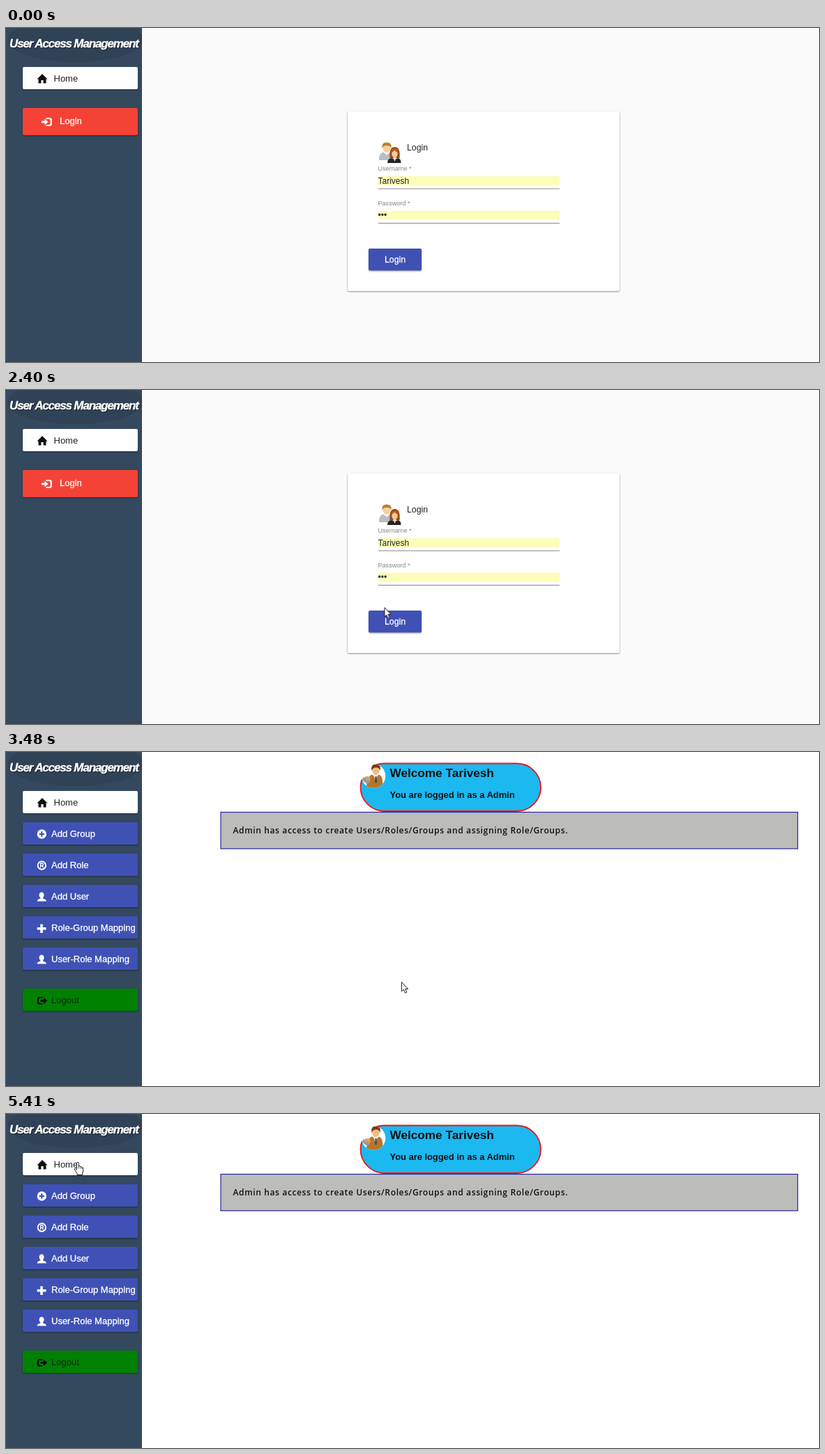
An HTML page for the animation above (8000 ms loop, 1166 by 480 pixels).

```html
<!DOCTYPE html>
<html lang="en">
<head>
<meta charset="utf-8">
<title>User Access Management</title>
<style>
  html, body { margin: 0; width: 100%; height: 100%; overflow: hidden; background: #fff; }
  svg { display: block; width: 100%; height: 100%; }
  text { font: 13px "Liberation Sans", Arial, sans-serif; fill: #222; }

  .title { font-size: 17px; font-weight: bold; font-style: italic; letter-spacing: -1.15px;
    fill: #fff; stroke: #fff; stroke-width: .4; filter: drop-shadow(1px 1px 0 #141d26); }
  .light text { fill: #fff; stroke: #fff; stroke-width: .3; }
  .label { font-size: 9.1px; fill: #858585; }
  .field { font-size: 12px; }
  .small { font-size: 12.3px; }
  .welcome { font-size: 17.2px; font-weight: bold; fill: #111; }
  .status { font-size: 12.9px; font-weight: bold; fill: #111; }
  .note { font: 600 12px "Open Sans", "Noto Sans", sans-serif; letter-spacing: .63px; fill: #111; }
  .raised { filter: drop-shadow(0 1.5px 1.2px rgba(0, 0, 0, .4)); }
  .card { filter: drop-shadow(0 1px 1.3px rgba(0, 0, 0, .45)); }
  .pressed { filter: drop-shadow(0 3px 3px rgba(0, 0, 0, .5)); }

  /* 1% of the loop is 80 ms */
  .before, .after, .pressed, .ripple, .arrow, .hand { animation: 8s step-end infinite; }
  .before { animation-name: before; }
  .after { animation-name: after; }
  .pressed { animation-name: press; }
  .ripple { animation-name: ripple; }
  .arrow { animation-name: arrow; }
  .hand { animation-name: hand; }
  .cursor { animation: move 8s linear infinite; }

  @keyframes before { 0% { opacity: 1 } 43.45%, 100% { opacity: 0 } }
  @keyframes after { 0% { opacity: 0 } 43.45%, 100% { opacity: 1 } }
  @keyframes press { 0% { opacity: 0 } 41.6%, 100% { opacity: 1 } }
  @keyframes ripple {
    0% { transform: translate(567px, 333px) scale(0) }
    41.6% { transform: translate(567px, 333px) scale(.35) }
    42.6%, 100% { transform: translate(567px, 333px) scale(1) }
  }
  @keyframes hand {
    0% { opacity: 0 } 11.625% { opacity: 1 } 15.225% { opacity: 0 }
    35.7% { opacity: 1 } 42.6% { opacity: 0 }
    63.775% { opacity: 1 } 64.7% { opacity: 0 } 65.6%, 100% { opacity: 1 }
  }
  @keyframes arrow {
    0% { opacity: 0 } 2% { opacity: 1 } 11.625% { opacity: 0 } 15.225% { opacity: 1 }
    35.7% { opacity: 0 } 42.6% { opacity: 1 }
    63.775% { opacity: 0 } 64.7% { opacity: 1 } 65.6%, 100% { opacity: 0 }
  }
  @keyframes move {
    0% { transform: translate(938px, 410px) }
    2% { transform: translate(938px, 410px); animation-timing-function: steps(10, end) }
    11.625% { transform: translate(565px, 332px) }
    12.375% { transform: translate(565px, 332px); animation-timing-function: steps(7, start) }
    19.025% { transform: translate(475px, 321px) }
    30% { transform: translate(475px, 321px); animation-timing-function: steps(2, start) }
    32% { transform: translate(610px, 303px) }
    33.7% { transform: translate(610px, 303px); animation-timing-function: steps(3, start) }
    36.7% { transform: translate(591px, 328px); animation-timing-function: steps(4, start) }
    40.4% { transform: translate(567px, 330px) }
    46.375% { transform: translate(567px, 330px); animation-timing-function: steps(5, start) }
    51.06% { transform: translate(422px, 307px) }
    56.1% { transform: translate(422px, 307px); animation-timing-function: steps(5, start) }
    60.8% { transform: translate(278px, 180px) }
    61% { transform: translate(278px, 180px); animation-timing-function: steps(6, start) }
    66.55% { transform: translate(117px, 78px) }
    66.75% { transform: translate(117px, 78px); animation-timing-function: steps(2, start) }
    68.4%, 100% { transform: translate(103px, 69px) }
  }
</style>
</head>
<body>
<svg viewBox="0 0 1166 480">
  <defs>
    <rect id="item" x="24" width="165" height="32" rx="2"/>
    <path id="person" d="M51 0C53.300 0 54.700 1.800 54.500 4.200C54.400 6 53.700 7 53 7.800V9C55.500 10 57.500 10.300 58 13H44.500C45 10.300 47 10 49.300 9V7.800C48.300 7 47.700 6 47.600 4.200C47.500 1.800 48.900 0 51 0Z"/>
    <clipPath id="sideClip"><rect width="195" height="480"/></clipPath>
    <clipPath id="buttonClip"><rect x="520" y="317" width="76" height="31.500" rx="2"/></clipPath>
    <clipPath id="avatarClip"><circle cx="527" cy="34.500" r="17.300"/></clipPath>
  </defs>

  <rect width="1166" height="480" fill="#fff"/>

  <g clip-path="url(#sideClip)">
    <rect width="195" height="480" fill="#34495e"/>
    <ellipse cx="100" cy="17" rx="97" ry="32" fill="#2f4256"/>
  </g>
  <text class="title" x="5" y="28">User Access Management</text>
  <use href="#item" y="56" fill="#fff" class="raised"/>
  <path d="M52 66L59.500 73.500H57.500V79.500H53.600V75H50.400V79.500H46.500V73.500H44.500Z" fill="#111"/>
  <text x="68.500" y="76.500">Home</text>

  <g class="before">
    <rect x="195" width="971" height="480" fill="#fafafa"/>
    <rect class="raised" x="24" y="115" width="165" height="39" rx="2" fill="#f44336"/>
    <g class="light">
      <path d="M51 133.500H55.500V130.500L60.500 135L55.500 139.500V136.500H51Z" fill="#fff"/>
      <path d="M57.500 130H62.500Q64.700 130 64.700 132.200V137.800Q64.700 140 62.500 140H57.500" fill="none" stroke="#fff" stroke-width="2.200"/>
      <text x="77" y="138">Login</text>
    </g>

    <rect class="card" x="490" y="120" width="390" height="258" rx="2" fill="#fff"/>
    <g>
      <path d="M535 190Q534.500 180 541 178.500L546 182L551 178.500Q555 180 556 190Z" fill="#b9bdc6"/>
      <path d="M543 178L546 183L549 178Z" fill="#fff"/>
      <ellipse cx="546" cy="172.500" rx="5.500" ry="6.500" fill="#f5cf9e"/>
      <path d="M539.500 173Q538 164.500 546 164.500Q554 164.500 552.500 173Q551 168.500 546 169Q541 168.500 539.500 173Z" fill="#b98228"/>
      <path d="M550.500 187Q549 171 557.500 171Q566 171 564.500 187Z" fill="#9b4a17"/>
      <path d="M547 194Q547 187.500 553 187L557.500 189L562 187Q566.500 187.500 566.500 194Z" fill="#242424"/>
      <path d="M555 186H560L557.500 192Z" fill="#f5d5ae"/>
      <ellipse cx="557.500" cy="180.500" rx="4.200" ry="5.700" fill="#f6c999"/>
      <path d="M552.500 179Q553 173 558 173Q562.500 173 562.500 179Q559 178 557 175.500Q555.500 178 552.500 179Z" fill="#b65b1d"/>
    </g>
    <text class="small" x="575" y="176">Login</text>
    <text class="label" x="533.500" y="205">Username *</text>
    <rect x="534" y="213" width="260" height="13" fill="#fbfdb9"/>
    <text class="field" x="533.500" y="223.500">Tarivesh</text>
    <rect x="534" y="230.500" width="260" height="1" fill="#858585"/>
    <text class="label" x="533.500" y="254.500">Password *</text>
    <rect x="534" y="262.500" width="260" height="13" fill="#fbfdb9"/>
    <text class="field" x="533.500" y="273">•••</text>
    <rect x="534" y="280" width="260" height="1" fill="#858585"/>

    <rect class="raised" x="520" y="317" width="76" height="31.500" rx="2" fill="#3f51b5"/>
    <rect class="pressed" x="520" y="317" width="76" height="31.500" rx="2" fill="#3f51b5"/>
    <g clip-path="url(#buttonClip)">
      <circle class="ripple" r="33" fill="#fff" fill-opacity=".12"/>
    </g>
    <g class="light"><text class="small" x="543" y="337">Login</text></g>
  </g>

  <g class="after">
    <g class="raised" fill="#3f51b5">
      <use href="#item" y="101"/>
      <use href="#item" y="146"/>
      <use href="#item" y="191"/>
      <use href="#item" y="236"/>
      <use href="#item" y="281"/>
      <use href="#item" y="340" fill="#008000"/>
    </g>
    <g class="light" fill="#fff">
      <circle cx="51.300" cy="118" r="6.700"/>
      <path d="M47.500 118H55.100M51.300 114.200V121.800" stroke="#3f51b5" stroke-width="2.200"/>
      <text x="65" y="121.500">Add Group</text>
      <circle cx="51.300" cy="163" r="5.700" fill="none" stroke="#fff" stroke-width="1.900"/>
      <path d="M49.600 166.200V160H51.700Q53.300 160 53.300 161.700T51.700 163.300H49.600M51.700 163.300L53.400 166.200" fill="none" stroke="#fff" stroke-width="1.300"/>
      <text x="65" y="166.500">Add Role</text>
      <use href="#person" y="201.500"/>
      <text x="65" y="211.500">Add User</text>
      <path d="M49.200 247.500H52.800V252H57.500V255.500H52.800V260H49.200V255.500H44.700V252H49.200Z"/>
      <text x="65" y="256.500">Role-Group Mapping</text>
      <use href="#person" y="291.500"/>
      <text x="65" y="301.500">User-Role Mapping</text>
    </g>
    <path d="M52.500 353H48.200Q46 353 46 355.200V359.800Q46 362 48.200 362H52.500" fill="none" stroke="#111" stroke-width="2.200"/>
    <path d="M49.500 356H54V353L59.200 357.500L54 362V359H49.500Z" fill="#111"/>
    <text x="65" y="360.500" style="fill:#0b2c0b">Logout</text>

    <rect x="508.500" y="16.500" width="258.500" height="68.500" rx="34.250" fill="#1cb8f0" stroke="#f01414" stroke-width="1.800"/>
    <circle cx="527" cy="34.500" r="17.300" fill="#fff"/>
    <g clip-path="url(#avatarClip)">
      <path d="M517 52Q517 35 525 32.500L530 36L535 32.500Q541 35 540 46L536 52Z" fill="#b87528"/>
      <path d="M527 32L530 42L533.500 32Z" fill="#fff"/>
      <path d="M529.500 35H531.500L532 43L530.500 45L529 43Z" fill="#334d70"/>
      <ellipse cx="530.500" cy="26" rx="5.300" ry="7" fill="#f1bd85"/>
      <path d="M524.500 27Q522.500 17.500 531 17.500Q538.500 18 536.500 27Q535.500 22 531 22.500Q526 22 524.500 27Z" fill="#70401a"/>
      <ellipse cx="518" cy="39" rx="4.700" ry="4" fill="#d6a16b"/>
      <path d="M512 36L522 43L518 46L511 41Z" fill="#9c9b99"/>
    </g>
    <text class="welcome" x="550.500" y="35.500">Welcome Tarivesh</text>
    <text class="status" x="550.500" y="66">You are logged in as a Admin</text>
    <rect x="308" y="86.500" width="827.500" height="52.500" fill="#bcbcba" stroke="#2626a0" stroke-width="1.200"/>
    <text class="note" x="325.500" y="117">Admin has access to create Users/Roles/Groups and assigning Role/Groups.</text>
  </g>

  <g class="cursor" fill="#fff" stroke="#1c1c28" stroke-linejoin="round">
    <path class="arrow" d="M.4 .6V14L3.300 11.300L5.400 16.300L7.700 15.300L5.600 10.500H9.600Z"/>
    <g class="hand">
      <path d="M-1.600 1.600Q-1.600 .4 -.1 .4Q1.300 .4 1.300 1.600V6Q3.500 5.200 4 6.800Q5.700 6.200 6.200 7.800Q7.700 7.700 7.700 9.500V13L6.500 16V18.500H-1V16.500L-4.600 11Q-5 9 -3.200 9.200L-1.600 11Z"/>
      <path d="M1.300 6V9.500M4 6.800V9.700M6.200 7.800V10" fill="none" stroke-width=".8"/>
    </g>
  </g>
</svg>
</body>
</html>
```
